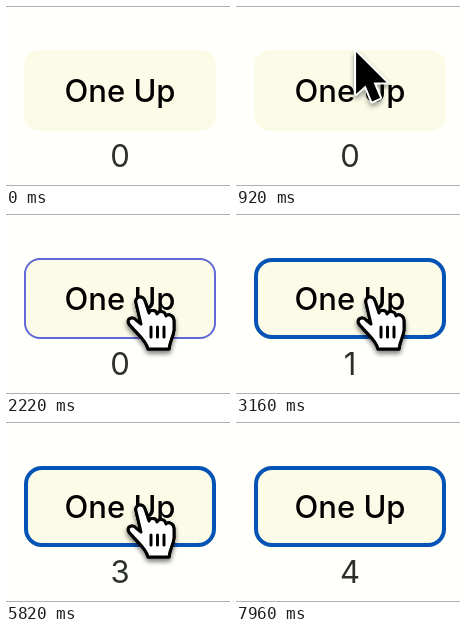
Animation, 224 px wide and 180 px high, one loop 8000 ms. Source, as an HTML page with a canvas:

```html
<!DOCTYPE html>
<html lang="en">
<head>
<meta charset="utf-8">
<title>One Up</title>
<style>
html, body { margin: 0; width: 224px; height: 180px; overflow: hidden; background: #fffffb; }
canvas { display: block; }
</style>
</head>
<body>
<canvas id="stage" width="224" height="180"></canvas>
<script>
const ctx = document.getElementById('stage').getContext('2d');
const LOOP = 8000;
const CLICKS = [2500, 3850, 5200, 6550];
const FOCUS_AT = 2420;
const HOVER_AT = 940;
const HAND_AT = 1560;
const BUTTON = { x: 18, y: 44, w: 192, h: 81, r: 16 };

// The pointer glides in, rests on the button, then leaves.
const REST = { x: 125, y: 77 };
const ENTER = { x: 103, y: -62, from: 410, to: 1380 };
const LEAVE = { x: 182, y: -66, from: 7140, to: 7700 };

const arrow = new Path2D('M0 0V42L9.5 33.5L16 49.5L24 46L17.5 30.5H30.5Z');
const hand = new Path2D(
  'M5 12C3 6 12 3 14 10L18 22C18 19 25 18 26 23C28 19 34 20 35 25' +
  'C38 22 43 25 43 30V39C42 47 39 49 38 58H17C16 50 5 42 -2 33' +
  'C-5 28 1 25 5 29L10 33Z');
const creases = new Path2D('M20 36V46M26.5 36V46M33 36V46');

const clamp = v => Math.max(0, Math.min(1, v));
const progress = (t, from, to) => clamp((t - from) / (to - from));
const mix = (a, b, k) => [a.x + (b.x - a.x) * k, a.y + (b.y - a.y) * k];

function pointerAt(t) {
  if (t < LEAVE.from) {
    const left = 1 - progress(t, ENTER.from, ENTER.to);
    return mix(REST, ENTER, left * left);
  }
  const u = progress(t, LEAVE.from, LEAVE.to);
  return mix(REST, LEAVE, u * u);
}

function outline(width, radius, color) {
  const { x, y, w, h } = BUTTON, d = width / 2;
  ctx.beginPath();
  ctx.roundRect(x + d, y + d, w - width, h - width, radius - d);
  ctx.lineWidth = width;
  ctx.strokeStyle = color;
  ctx.stroke();
}

function label(text, y, weight, color) {
  ctx.font = `${weight} 31px Inter, "Liberation Sans", sans-serif`;
  ctx.textAlign = 'center';
  ctx.textBaseline = 'alphabetic';
  ctx.fillStyle = color;
  ctx.fillText(text, 114, y);
}

function shadow(on) {
  ctx.shadowColor = on ? 'rgba(0,0,0,0.45)' : 'transparent';
  ctx.shadowBlur = on ? 5 : 0;
  ctx.shadowOffsetY = on ? 3 : 0;
}

function drawPointer(t) {
  const [x, y] = pointerAt(t);
  const pointing = t >= HAND_AT && y > BUTTON.y;
  ctx.save();
  ctx.translate(x, y);
  ctx.lineJoin = 'round';
  ctx.lineCap = 'round';
  shadow(true);
  if (pointing) {
    ctx.lineWidth = 3;
    ctx.strokeStyle = '#000';
    ctx.stroke(hand);
    ctx.fillStyle = '#fff';
    ctx.fill(hand);
    shadow(false);
    ctx.stroke(hand);
    ctx.stroke(creases);
  } else {
    ctx.lineWidth = 4;
    ctx.strokeStyle = '#fff';
    ctx.stroke(arrow);
    shadow(false);
    ctx.fillStyle = '#000';
    ctx.fill(arrow);
  }
  ctx.restore();
}

function draw(t) {
  ctx.fillStyle = '#fffffb';
  ctx.fillRect(0, 0, 224, 180);
  ctx.fillStyle = '#b0b0ac';
  ctx.fillRect(0, 0, 224, 1);
  ctx.fillRect(0, 179, 224, 1);

  const { x, y, w, h, r } = BUTTON;
  ctx.beginPath();
  ctx.roundRect(x, y, w, h, r);
  ctx.fillStyle = '#fbfbe8';
  ctx.fill();

  if (t >= FOCUS_AT) {
    outline(4, r + 2, '#0453b6');
  } else {
    const k = progress(t, HOVER_AT, HOVER_AT + 250);
    if (k > 0) outline(2, r, `rgba(97,105,216,${k})`);
  }

  label('One Up', 96, 500, '#000');
  label(CLICKS.filter(c => t >= c).length, 161, 400, '#2b302b');
  drawPointer(t);
}

const start = performance.now();
function tick() {
  draw((performance.now() - start) % LOOP);
  requestAnimationFrame(tick);
}
tick();
</script>
</body>
</html>
```
